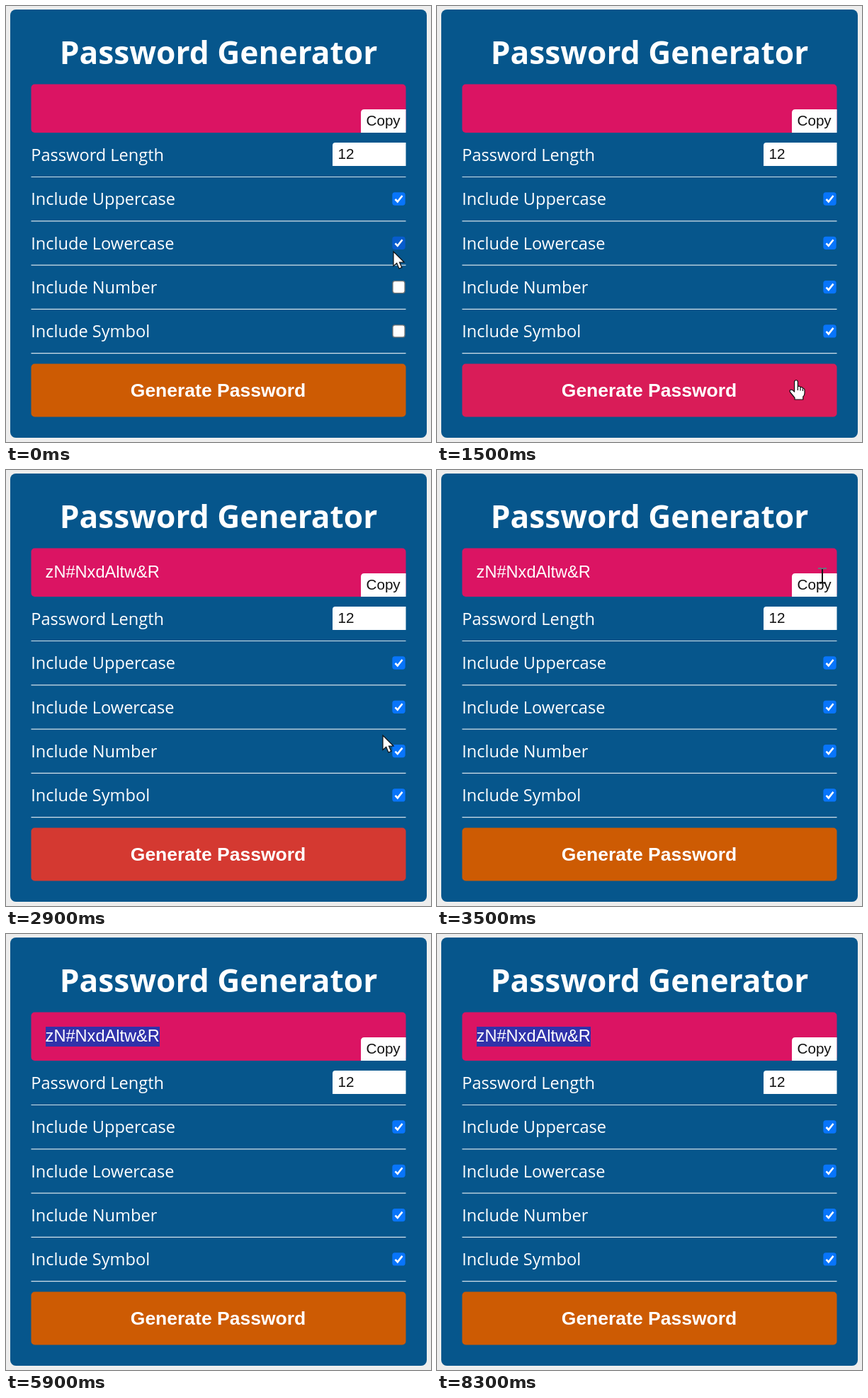
These frames come from a looping animation (600 px wide and 616 px high, 8.4 s). An HTML page:

```html
<!DOCTYPE html>
<html lang="en">
<head>
<meta charset="utf-8">
<title>Password Generator</title>
<style>
  html, body { margin: 0; width: 100%; height: 100%; overflow: hidden; background: #ededed; }
  svg { display: block; width: 600px; height: 616px; }
  text { fill: #fff; font: 23.6px "Liberation Sans", Arial, sans-serif; }
  .title { font: 700 44.25px "Open Sans", sans-serif; text-anchor: middle; }
  .label { font: 23.6px "Open Sans", sans-serif; }
  .small { font-size: 20.65px; fill: #111; }
  .action { font-size: 26.5px; font-weight: 700; text-anchor: middle; }
</style>
</head>
<body>
<svg viewBox="0 0 600 616">
  <rect x="6" y="5" width="588" height="605" rx="8" fill="#06568c"/>
  <text class="title" x="300" y="82">Password Generator</text>

  <rect x="35.5" y="110.5" width="529" height="68.5" rx="5" fill="#db1463"/>
  <rect id="selection" x="56" y="131" width="161" height="28" fill="#3032aa"/>
  <text id="password" x="55.6" y="152">zN#NxdAltw&amp;R</text>
  <path d="M501 179V151q0-5 5-5H564.5V179z" fill="#fff"/>
  <text class="small" x="508.5" y="169">Copy</text>

  <g id="rows"></g>
  <path d="M461 226V197q0-4 4-4H564.5V226z" fill="#fff"/>
  <text class="small" x="468.5" y="216">12</text>

  <rect id="button" x="35.5" y="505.5" width="529" height="75" rx="5"/>
  <text class="action" x="299.5" y="552">Generate Password</text>

  <g id="cursor">
    <path id="arrow" d="M0 0V20.5L4.7 16.2 8 24 11.8 22.4 8.5 15H15z" fill="#fff" stroke="#111" stroke-width="1.2"/>
    <g id="hand" stroke="#111" stroke-width="1.2" stroke-linejoin="round">
      <path d="M-2.4 2.4Q0 -1.4 2.4 2.4V9.5Q5 8.4 6 10.6 8.6 9.8 9.4 12 12 12 12 15V19Q12 22 9.8 24V28H-2V25.5L-8.5 17.5Q-9.8 14.6 -7 14 -5 14 -2.4 17z" fill="#fff"/>
      <path d="M2.4 9.5V15M6 11V15.5M9.4 12.5V16" fill="none"/>
    </g>
    <g id="beam" fill="none" stroke-width="2">
      <path d="M-6-9H-2L0-8 2-9H6" stroke="#66757d"/>
      <path d="M0-8V11M-4 12L0 11 4 12" stroke="#151515"/>
    </g>
  </g>
</svg>
<script>
const LOOP = 8400, FRAME = 100;
const PINK = [219, 20, 99], ORANGE = [205, 91, 3];
const $ = id => document.getElementById(id);

// Label and the time its box gets checked
const rows = [
  ["Password Length", null],
  ["Include Uppercase", 0],
  ["Include Lowercase", 0],
  ["Include Number", 400],
  ["Include Symbol", 800],
];

$("rows").innerHTML = rows.map(([label, checkedAt], i) => {
  const y = 62.3 * i;
  const box = checkedAt === null ? "" : `
    <g class="check" transform="translate(545.5 ${y + 201.2})">
      <rect x=".5" y=".5" width="17" height="17" rx="3" stroke-width="1.3"/>
      <path d="M4 9.5L7.3 13 14 4.5" fill="none" stroke="#fff" stroke-width="2.6"/>
    </g>`;
  return `<text class="label" x="35.2" y="${y + 219}">${label}</text>
    <path d="M35.5 ${y + 241.5}H564.5" stroke="#d5e2eb" stroke-width="1.2"/>${box}`;
}).join("");
const checks = [...document.querySelectorAll(".check")];

// Pointer stops: time, x, y; the pointer is hidden outside each path
const paths = [
  [[0, 547, 347], [300, 551, 396], [500, 551, 396], [700, 551, 459], [900, 551, 459],
   [1400, 507, 528], [2500, 507, 528], [2700, 480, 460], [3100, 584, 290],
   [3500, 544, 148], [3700, 540, 162], [4300, 540, 162]],
  [[6500, 601, 440], [6900, 530, 480], [7300, 461, 528], [7500, 461, 528], [8000, 530, -28]],
];

const clamp = v => Math.min(1, Math.max(0, v));
const smooth = v => v * v * (3 - 2 * v);
const ramp = (t, start, duration) => smooth(clamp((t - start) / duration));

function pointerAt(t) {
  const path = paths.find(p => t >= p[0][0] && t < p.at(-1)[0]);
  if (!path) return null;
  const next = path.findIndex(stop => stop[0] > t);
  const [t0, x0, y0] = path[next - 1], [t1, x1, y1] = path[next];
  const k = ramp(t, t0, t1 - t0);
  return [x0 + (x1 - x0) * k, y0 + (y1 - y0) * k];
}

function pointerShape(x, y) {
  if (x < 35 || x > 564) return "arrow";
  if (y > 505 && y < 581) return "hand";
  if (x > 501 && y > 149 && y < 179) return "hand";
  return y > 110 && y < 179 ? "beam" : "arrow";
}

const show = (element, visible) => element.style.display = visible ? "" : "none";

function draw(t) {
  show($("password"), t >= 2100);
  show($("selection"), t >= 3900);

  const hover = ramp(t, 1130, 470) * (1 - ramp(t, 2660, 470))
              + ramp(t, 7230, 470) * (1 - ramp(t, 7580, 470));
  $("button").setAttribute("fill", `rgb(${ORANGE.map((c, i) => Math.round(c + (PINK[i] - c) * hover))})`);

  const pointer = pointerAt(t);
  show($("cursor"), pointer);
  if (pointer) {
    $("cursor").setAttribute("transform", `translate(${pointer})`);
    const shape = pointerShape(...pointer);
    for (const id of ["arrow", "hand", "beam"]) show($(id), id === shape);
  }

  checks.forEach((check, i) => {
    const [box, tick] = check.children;
    const checked = t >= rows[i + 1][1];
    const hovered = i === 1 && t < 100;
    const blue = hovered ? "#075ccd" : "#0875fb";
    box.setAttribute("fill", checked ? blue : "#fff");
    box.setAttribute("stroke", checked ? blue : "#767676");
    show(tick, checked);
  });
}

const started = performance.now();
function tick() {
  const t = (performance.now() - started) % LOOP;
  draw(Math.floor(t / FRAME) * FRAME);
  requestAnimationFrame(tick);
}
tick();
</script>
</body>
</html>
```
